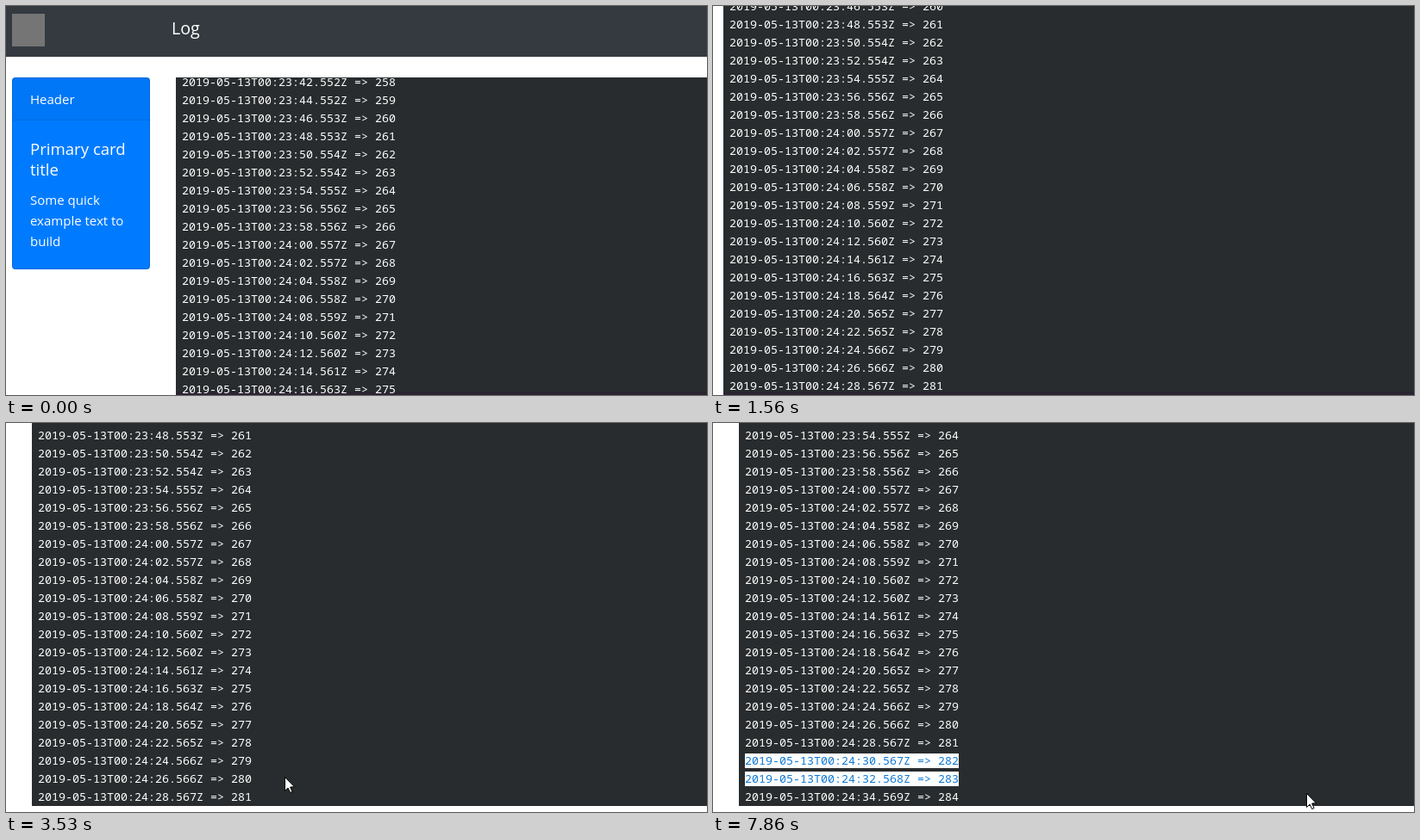
Animation of 813 by 452 pixels, one loop 8 s. Source, as an HTML page with a canvas:

```html
<!DOCTYPE html>
<html lang="en">
<head>
<meta charset="utf-8">
<title>Log</title>
<style>
  html, body { margin: 0; width: 100%; height: 100%; overflow: hidden; background: #fff; }
  canvas { display: block; }
</style>
</head>
<body>
<canvas id="stage" width="813" height="452"></canvas>
<script>
const ctx = document.getElementById('stage').getContext('2d');
const LOOP = 8000, STEP = 120, ROWS = 22, ROW_H = 21, FIRST = 258;
const SANS = 'px "Open Sans", "Noto Sans", sans-serif';
const MONO = '500 13.333px "Noto Sans Mono", "DejaVu Sans Mono", monospace';

// Legs of a movement: start time, number of steps, end point
const pageLegs = [
  [1120, 1, -32, -55], [1250, 1, -178, -88], [1390, 1, -197, -88],
  [1560, 1, -185, -88], [1680, 2, -167, -94], [1950, 1, -167, -95]
];
const pointerLegs = [
  [2380, 1, 404, 12], [2510, 2, 199, 361], [2770, 3, 331, 409], [3170, 4, 323, 411],
  [3960, 2, 323, 416], [4790, 2, 321, 360], [5680, 1, 315, 408], [5820, 2, 301, 365],
  [6920, 2, 322, 414], [7190, 2, 410, 425], [7470, 2, 579, 430], [7740, 2, 688, 430]
];

function follow(legs, t, x, y) {
  for (const [start, steps, endX, endY] of legs) {
    if (t < start) break;
    const p = Math.min(1, (Math.floor((t - start) / STEP) + 1) / steps);
    x += Math.round((endX - x) * p);
    y += Math.round((endY - y) * p);
  }
  return [x, y];
}

const lastEntry = t => t < 150 ? 279 : t < 1120 ? 280 : t < 5080 ? 281 : 284;
const hasSelection = t => (t >= 4940 && t < 5080) || t >= 5950;

function rect(x, y, w, h, color) {
  ctx.fillStyle = color;
  ctx.fillRect(x, y, w, h);
}

function text(str, x, y, font, color = '#fff') {
  ctx.font = font;
  ctx.fillStyle = color;
  ctx.fillText(str, x, y);
}

// The timer drifts by about half a millisecond per entry, with one larger slip.
function entry(n) {
  const i = n - FIRST;
  const drift = Math.floor(i * .58) + (i > 16 ? 2 : 0);
  const time = new Date(Date.UTC(2019, 4, 13, 0, 23, 42, 552) + i * 2000 + drift);
  return time.toISOString() + ' => ' + n;
}

function drawHeader() {
  rect(0, 0, 1100, 59, '#343a40');
  rect(7, 9, 38, 38, '#757575');
  text('Log', 192, 33, '500 19.7' + SANS);
}

function drawCard() {
  ctx.save();
  ctx.beginPath();
  ctx.roundRect(7, 83, 160, 223, 4);
  ctx.clip();
  rect(7, 83, 160, 223, '#007bff');
  rect(7, 83, 160, 49, 'rgba(0,0,0,.03)');
  rect(7, 132, 160, 1, 'rgba(0,0,0,.125)');
  ctx.restore();
  ctx.beginPath();
  ctx.roundRect(7.5, 83.5, 159, 222, 3.5);
  ctx.strokeStyle = 'rgba(0,0,0,.125)';
  ctx.lineWidth = 1;
  ctx.stroke();
  const lines = (list, y, font) => list.forEach((s, i) => text(s, 28, y + i * 24, font));
  lines(['Header'], 114, '500 15' + SANS);
  lines(['Primary card', 'title'], 173, '500 18.6' + SANS);
  lines(['Some quick', 'example text to', 'build'], 231, '500 15' + SANS);
}

function drawLog(t, dy) {
  const last = lastEntry(t);
  ctx.save();
  ctx.beginPath();
  ctx.rect(197, 83, 900, 457);
  ctx.clip();
  rect(197, 83, 900, 457, '#282c2e');
  // Window edge, fixed to the bottom of the stage
  if (t < 1680) rect(197, 448 - dy, 900, 4, '#2c2431');
  for (let i = 0; i < ROWS; i++) {
    const n = last - ROWS + 1 + i, y = 93 + i * ROW_H;
    const selected = hasSelection(t) && (n === last - 1 || n === last - 2);
    if (selected) rect(204, y - 13, 248, 17, '#fff');
    text(entry(n), 204, y, MONO, selected ? '#0f78d4' : '#fff');
  }
  ctx.restore();
}

function drawPointer(x, y) {
  ctx.save();
  ctx.translate(x + .5, y + .5);
  ctx.beginPath();
  [[0, 0], [0, 16], [3.6, 12.6], [6.2, 18], [8.6, 17], [6.2, 11.5], [11, 11.3]]
    .forEach(p => ctx.lineTo(...p));
  ctx.closePath();
  ctx.fillStyle = '#fff';
  ctx.fill();
  ctx.strokeStyle = '#000';
  ctx.lineWidth = 1;
  ctx.stroke();
  ctx.restore();
}

function draw(t) {
  const [dx, dy] = follow(pageLegs, t, 0, 0);
  rect(0, 0, 813, 452, '#fff');
  ctx.save();
  ctx.translate(dx, dy);
  drawHeader();
  drawCard();
  drawLog(t, dy);
  ctx.restore();
  drawPointer(...follow(pointerLegs, t, -50, 0));
}

function tick() {
  draw(performance.now() % LOOP);
  requestAnimationFrame(tick);
}
tick();
</script>
</body>
</html>
```
